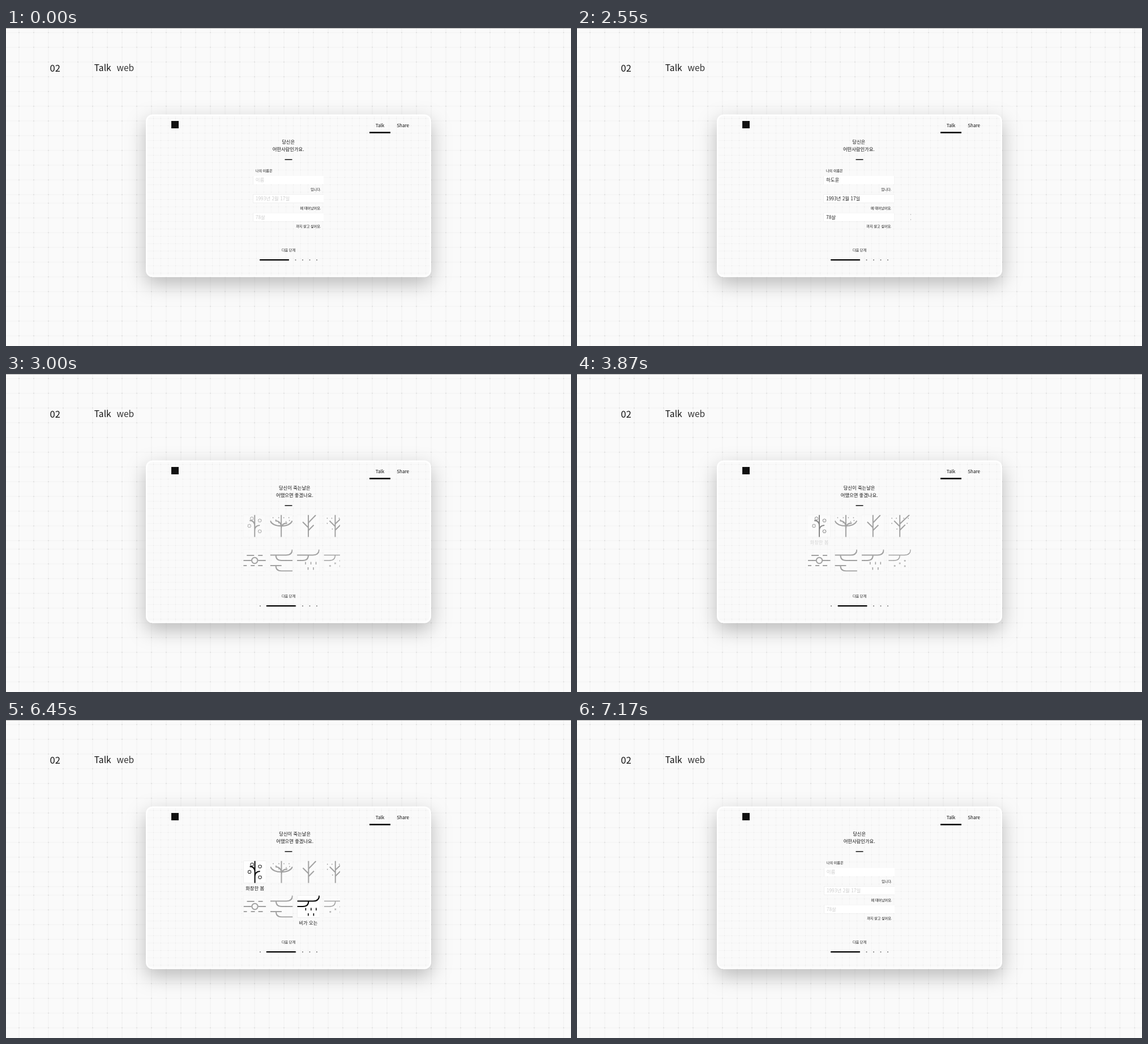
An HTML page for the animation above (7650 ms loop, 998x561 px).

```html
<!DOCTYPE html>
<html lang="ko">
<head>
<meta charset="utf-8">
<title>Talk web</title>
<style>
  html, body { margin: 0; width: 100%; height: 100%; overflow: hidden; background: #fafafa; }
  svg { display: block; width: 100%; height: 100%; }
  text { font-family: "Noto Sans CJK KR", "Noto Sans CJK", "Noto Sans", sans-serif; }
  .card { filter: drop-shadow(0 12px 17px rgba(0, 0, 0, .26)); }
  .field { filter: drop-shadow(.8px .9px .7px rgba(0, 0, 0, .22)); }
  .art { fill: none; stroke: #000; stroke-width: 2; }
</style>
</head>
<body>
<svg id="stage" viewBox="0 0 998 561" xmlns="http://www.w3.org/2000/svg"></svg>
<script>
const LOOP = 7650, STEP = 30, PAGE = 182;

const text = (x, middle, size, str, { anchor = "start", weight = 400, fill = "#111" } = {}) =>
  `<text x="${x}" y="${middle + size * .38}" font-size="${size}" text-anchor="${anchor}" font-weight="${weight}" fill="${fill}">${str}</text>`;
const rect = (x, y, w, h, fill, extra = "") =>
  `<rect x="${x}" y="${y}" width="${w}" height="${h}" fill="${fill}" ${extra}/>`;
const path = (d, width = 2) => `<path d="${d}" stroke-width="${width}"/>`;
const dots = (points, r = .9) =>
  points.map(([x, y]) => `<circle cx="${x}" cy="${y}" r="${r}" fill="#000" stroke="none"/>`).join("");

function flower(cx, cy) {
  const points = Array.from({ length: 14 }, (_, i) => {
    const r = i % 2 ? 2.2 : 3.3, a = i * Math.PI / 7;
    return `${(cx + r * Math.sin(a)).toFixed(2)},${(cy - r * Math.cos(a)).toFixed(2)}`;
  });
  return `<polygon points="${points.join(" ")}" stroke-width=".9"/>`;
}

const flake = (x, y) =>
  path(`M${x - 1.8} ${y}h3.6M${x - .9} ${y - 1.6}l1.8 3.2M${x + .9} ${y - 1.6}l-1.8 3.2`, .7);

const heading = lines => lines.map((line, i) =>
  text(498.6, 201 + i * 13, 8.3, line, { anchor: "middle", weight: 500 })).join("");

const trunk = "M20 0V39.5";
const hills = "M0 10H28Q39 10 39 0M20 10Q20 19.5 10 19.5H0";
const icons = [
  path(trunk + "M11 10Q20 10 20 20M29 18.5Q20 18.5 20 28") +
    [[15, 6.5], [29, 10], [10.5, 19.5], [29, 29]].map(p => flower(...p)).join(""),
  path("M19.5 0V39.5M0 10.5Q4 19.5 19.5 19.5Q35 19.5 39 10.5M9 10.5Q19.5 11 19.5 22M30 14.5Q19.5 15 19.5 24") +
    dots([[5, 5], [15, 5], [24, 5], [33, 5], [10, 9], [15, 14], [28, 12], [34, 10]]),
  path(trunk + "M20 14L33 .5M10 12.5L20 22.5M29.5 18L20 27.5"),
  path(trunk + "M20 16L37 0M10 10.5L20 20.5M29.5 17.5L20 27"),
  path("M6 10.5H19M26 10.5H34M0 19.5H14M26 19.5H40M0 28.5H6M13 28.5H20M26 28.5H34") +
    `<circle cx="20" cy="19.5" r="5.2"/>`,
  path("M0 10H28Q39 10 39 0M10 10Q10 19.5 20 19.5H39.5M0 28.5H20M10 28.5Q10 38 20 38H39.5"),
  path(hills) + path("M15 22v4.5M24.500 22v4.500M33.500 22v4.500M19.500 31.500v4.500M29 31.500v4.500", 1.6),
  path(hills, 1.4) + [[20, 24.5], [29, 20], [29, 29.5], [11, 29]].map(p => flake(...p)).join("")
];
icons[3] += dots([[6, 6], [14, 6], [27, 6], [6, 15], [33, 15], [15, 25], [35, 6]]);

const tile = (art, i) => {
  const x = 408 + (i % 4) * 47.4, y = 248.5 + Math.floor(i / 4) * 61;
  return `<g id="tile${i}" transform="translate(${x} ${y})" opacity=".35">
    ${rect(0, 0, 39.5, 39, "#fff", 'class="field"')}
    <svg width="39.5" height="39" class="art">${art}</svg></g>`;
};

const fields = [261, 293.5, 326.2];
const values = list => fields.map((y, i) => text(440.8, y + 7.3, 8.4, list[i], { fill: "inherit" })).join("");

const formPage = heading(["당신은", "어떤사람인가요."]) +
  text(440.8, 251.8, 6.1, "나의 이름은") +
  fields.map((y, i) =>
    rect(436.5, y, 124.5, 15, "#fff", 'class="field"') +
    text(556.5, y + 23.7, 6.1, ["입니다.", "에 태어났어요.", "까지 살고 싶어요."][i], { anchor: "end" })).join("") +
  `<g id="hint" fill="#ccc">${values(["이름", "1993년 2월 17일", "78살"])}</g>
   <g id="answer" fill="#222">${values(["하도윤", "1993년 2월 17일", "78살"])}</g>`;

const moodPage = heading(["당신이 죽는날은", "어땠으면 좋겠나요."]) +
  icons.map(tile).join("") +
  `<g id="label0">${text(428, 297, 8.3, "화창한 봄", { anchor: "middle" })}</g>
   <g id="label6">${text(522.3, 358.2, 8.3, "비가 오는", { anchor: "middle" })}</g>`;

const derived = (id, transform) => `<pattern id="${id}" href="#cell" patternTransform="${transform}"/>`;

document.getElementById("stage").innerHTML = `
  <defs>
    <pattern id="cell" width="26" height="26" patternUnits="userSpaceOnUse" patternTransform="translate(10 -5)">
      <path d="M0 13H26M13 0V26" stroke="#f2f2f2" stroke-width="1.2"/>
      <circle cx="13" cy="13" r="1.1" fill="#dedede"/>
    </pattern>
    ${derived("lower", "translate(10 296)")}
    ${derived("small", "translate(254 153) scale(.5)")}
    <clipPath id="window">${rect(408, 190, PAGE, 190, "#000")}</clipPath>
  </defs>
  ${rect(0, 0, 998, 561, "#fafafa")}
  ${rect(0, 0, 998, 301, "url(#cell)")}
  ${rect(0, 301, 998, 260, "url(#lower)")}
  ${rect(0, 0, 998, 1, "#b0b0b0")}
  ${text(77.5, 70.3, 16.5, "02", { weight: 500 })}
  ${text(155.8, 70.3, 15.6, "Talk", { weight: 500 })}
  ${text(195.5, 70.3, 15.6, "web", { weight: 300, fill: "#333" })}
  ${rect(247, 152.500, 504, 287, "#fff", 'rx="12" class="card"')}
  ${rect(249.5, 155, 499, 282, "#fafafa", 'rx="10"')}
  ${rect(249.5, 155, 499, 282, "url(#small)", 'rx="10"')}
  ${rect(292, 164, 13, 13, "#111")}
  ${text(660.5, 172.300, 8.1, "Talk", { anchor: "middle", weight: 500 })}
  ${text(701.2, 172.300, 8.1, "Share", { anchor: "middle" })}
  ${rect(642, 183.2, 37, 2.5, "#000")}
  <g clip-path="url(#window)">
    <g id="form">${formPage}</g>
    <g id="mood">${moodPage}</g>
  </g>
  ${rect(492.5, 231.4, 13, 1.5, "#111")}
  ${text(499, 391.8, 6.1, "다음 단계", { anchor: "middle" })}
  <g opacity=".55">${dots([449, 511.5, 524, 536.5, 549].map(x => [x, 409.2]), 1)}</g>
  <rect id="bar" y="408.1" width="52" height="2.2" rx=".8"/>`;

const el = id => document.getElementById(id);
const ramp = (t, start, span) => Math.min(1, Math.max(0, (t - start) / span));
const easeOut = u => 1 - (1 - u) ** 4;
const shift = (id, x) => el(id).setAttribute("transform", `translate(${x.toFixed(2)} 0)`);
const fade = (id, v) => el(id).setAttribute("opacity", v.toFixed(3));

function draw(time) {
  const t = Math.floor((time % LOOP) / STEP) * STEP;
  const page = easeOut(ramp(t, 2549, 900)) - easeOut(ramp(t, 6435, 735 / .8));
  const settled = t >= 7170 ? 0 : page;
  shift("form", -PAGE * settled);
  shift("mood", PAGE * (1 - settled));
  el("bar").setAttribute("x", 448 + 12.5 * settled);

  const filled = t < 3450 ? ramp(t, 1260, 390) : 0;
  fade("hint", 1 - filled);
  fade("answer", filled);

  const release = 1 - ramp(t, 6435, 450);
  [[0, 3800, 460], [6, 5090, 550]].forEach(([i, start, span]) => {
    const picked = ramp(t, start, span) * release;
    fade("tile" + i, .35 + .65 * picked);
    fade("label" + i, picked);
  });
}

const begin = performance.now();
function tick() {
  draw(performance.now() - begin);
  requestAnimationFrame(tick);
}
draw(0);
requestAnimationFrame(tick);
</script>
</body>
</html>
```
